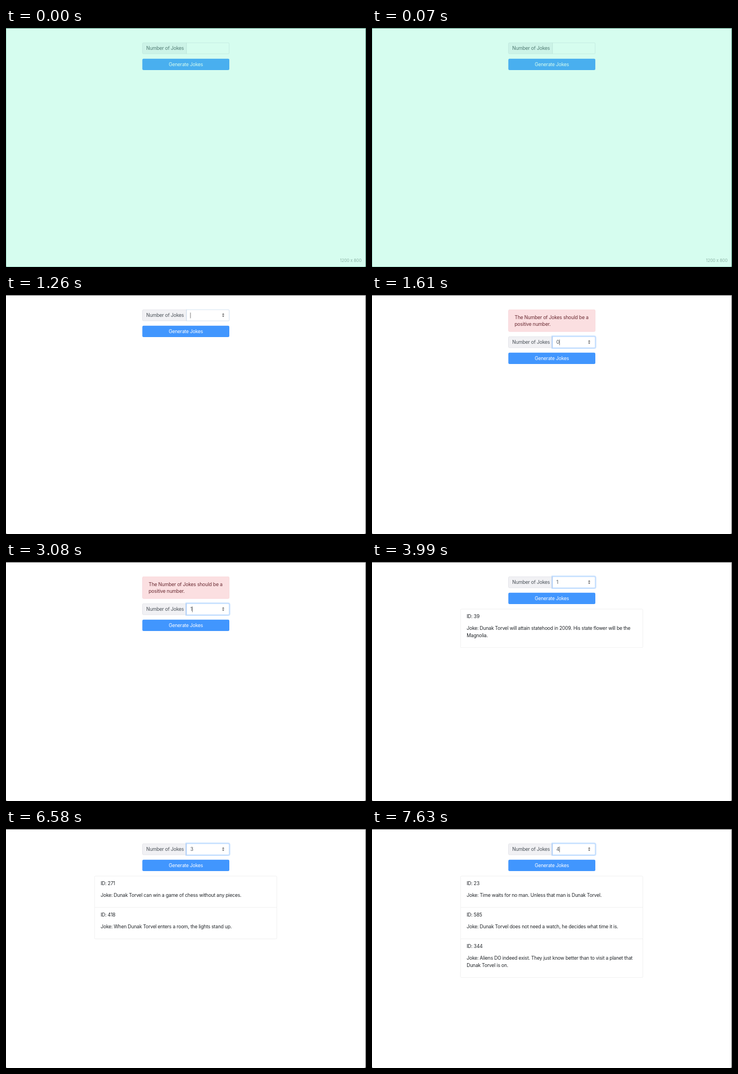
Animation of 640 by 426 pixels, one loop 8 s. Source, as an HTML page:

```html
<!DOCTYPE html>
<html lang="en">
<head>
<meta charset="utf-8">
<title>Joke generator</title>
<style>
  * { box-sizing: border-box; }
  html, body { margin: 0; width: 100%; height: 100%; overflow: hidden; background: #fff; }
  #stage { position: absolute; left: 0; top: 0; width: 640px; height: 426px; overflow: hidden; background: #626262; }
  #sheet { position: absolute; inset: 1px 1px 0 0; background: #fff; border-radius: 0 0 2px 2px; }
  #page {
    position: absolute; left: 0; top: 0; width: 1200px; height: 799px;
    transform: translate(-.3px, .4px) scale(.53333); transform-origin: 0 0;
    font: 16px/24px Inter, "Open Sans", sans-serif; letter-spacing: -.02em;
    color: #212529; white-space: pre;
  }
  #form { position: absolute; left: 455px; top: 48px; width: 290px; }
  #alert {
    height: 74px; margin-bottom: 16px; padding: 12px 20px;
    color: #6a2a32; background: #fbdfe1; border: 1px solid #f5ccd0; border-radius: 4px;
  }
  .group { position: relative; height: 38px; margin-bottom: 16px; }
  .label, #input { position: absolute; top: 0; height: 38px; padding: 6px 12px; border: 1px solid #d3d8dd; color: #495057; }
  .label { left: 0; width: 148px; background: #f1f1f4; border-radius: 4px 0 0 4px; }
  #input { left: 147px; width: 143px; background: #fff; border-radius: 0 4px 4px 0; }
  #caret { display: inline-block; width: 1px; height: 19px; background: #111; vertical-align: -4px; }
  #spin { position: absolute; right: 15px; top: 10px; width: 9px; height: 15px; fill: #4a4a4a; }
  .button { height: 38px; padding: 7px; text-align: center; color: #fff; background: #4196fe; border-radius: 4px; }
  #list { position: absolute; left: 295px; top: 156px; width: 609px; border: 1px solid #e4e4e4; border-radius: 4px; }
  .item { padding: 12px 20px; }
  .item + .item { border-top: 1px solid #e4e4e4; }
  .item p { margin: 0 0 16px; }
  #tint {
    position: absolute; inset: 0; background: rgba(97, 247, 193, .26);
    border: 1px solid rgba(50, 150, 115, .3);
    font: 7.4px/10px Inter, sans-serif; letter-spacing: -.01em; color: #8db4a6;
  }
  #tint span { position: absolute; right: 7px; bottom: 5px; }
</style>
</head>
<body>
<div id="stage">
  <div id="sheet"></div>
  <div id="page"><div id="form"><div id="alert">The Number of Jokes should be a
positive number.</div><div class="group"><div class="label">Number of Jokes</div><div id="input"><span id="value"></span><span id="caret"></span><svg id="spin" viewBox="0 0 10 16"><path d="M5 1.5 9 6.3H1zM5 14.5 9 9.7H1z"/></svg></div></div><div class="button">Generate Jokes</div></div><div id="list"></div></div>
  <div id="tint"><span>1200 x 800</span></div>
</div>
<script>
  const LOOP = 8000;
  const hero = 'Dunak Torvel';

  // Each entry holds from its time until the next one.
  const typed = [
    [0, ''], [1400, '0'], [2730, ''], [3010, '1'], [4340, ''],
    [4480, '2'], [5950, ''], [6020, '3'], [7490, ''], [7630, '4']
  ];
  const results = [
    [0, []],
    [3990, [
      [39, `${hero} will attain statehood in 2009. His state flower will be the\nMagnolia.`]
    ]],
    [5670, [
      [271, `${hero} can win a game of chess without any pieces.`],
      [418, `When ${hero} enters a room, the lights stand up.`]
    ]],
    [7630, [
      [23, `Time waits for no man. Unless that man is ${hero}.`],
      [585, `${hero} does not need a watch, he decides what time it is.`],
      [344, `Aliens DO indeed exist. They just know better than to visit a planet that\n${hero} is on.`]
    ]]
  ];
  const blinks = [1960, 3640, 5040, 6580];
  const BLINK = 490;

  const $ = id => document.getElementById(id);
  const [alertBox, input, value, caret, spin, list, tint] =
    ['alert', 'input', 'value', 'caret', 'spin', 'list', 'tint'].map($);

  const at = (track, t) => track.filter(([start]) => start <= t).pop()[1];
  const show = (el, on) => { el.style.display = on ? '' : 'none'; };
  const mix = (a, b, k) => Math.round(a + (b - a) * k);

  const item = ([id, joke]) =>
    `<div class="item"><p>ID: ${id}</p><p>Joke: ${joke}</p></div>`;

  let shown = null;

  function render(t) {
    const focus = t < 1260 ? 0 : Math.min(1, (Math.floor((t - 1260) / 70) + 1) / 3);
    input.style.borderColor = `rgb(${mix(211, 154, focus)},${mix(216, 196, focus)},${mix(221, 251, focus)})`;
    input.style.boxShadow = `0 0 0 ${3.2 * focus}px rgba(65,150,255,${.27 * focus})`;

    const hidden = blinks.some(b => t >= b && t < b + BLINK);
    value.textContent = at(typed, t);
    show(caret, focus > 0 && !hidden);
    show(spin, focus > 0);
    show(alertBox, t >= 1610 && t < 3220);
    show(tint, t < 140);

    const jokes = at(results, t);
    if (jokes !== shown) {
      shown = jokes;
      list.innerHTML = jokes.map(item).join('');
      show(list, jokes.length > 0);
    }
  }

  const begin = performance.now();
  function tick() {
    render((performance.now() - begin) % LOOP);
    requestAnimationFrame(tick);
  }
  tick();
</script>
</body>
</html>
```
